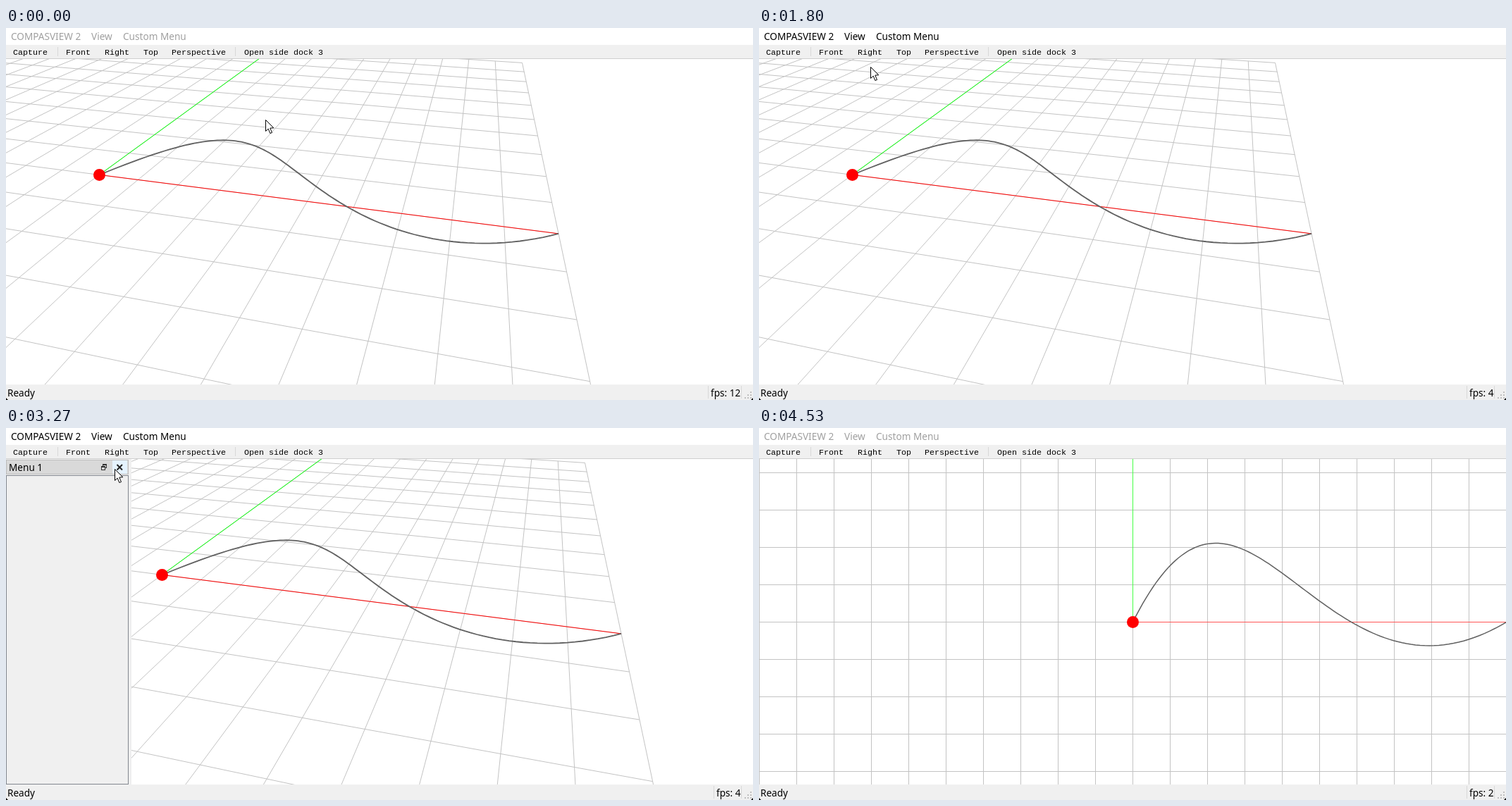
Animation, 1060 px wide and 528 px high, one loop 4.59 s. Source, as an HTML page with a canvas:

```html
<!DOCTYPE html>
<html>
<head>
<meta charset="utf-8">
<style>
html, body { margin: 0; width: 100%; height: 100%; overflow: hidden; background: #fff }
canvas { display: block }
</style>
</head>
<body>
<canvas id="stage" width="1060" height="528"></canvas>
<script>
const g = document.getElementById('stage').getContext('2d');
const LOOP = 4590, STEP = 200 / 3;
const UI = '13.6px "Noto Sans", "Open Sans", sans-serif';
const MONO = '11.667px "Liberation Mono", monospace';
const BUTTONS = [['Capture', 10], ['Front', 85], ['Right', 140], ['Top', 195],
  ['Perspective', 235], ['Open side dock 3', 338]];

// Pointer path: step, x, y
const PATH = [[0, 368, 130], [8, 371, 38], [13, 371, 38], [17, 116, 74], [18, 116, 74],
  [21, 168, 58], [24, 161, 54], [27, 158, 55], [34, 359, 40], [38, 359, 40],
  [44, 165, 80], [49, 154, 58], [50, 154, 58], [52, 166, 40], [54, 191, 36],
  [57, 191, 36], [64, 60, 532], [69, 60, 532]];
const PRESSED = [10, 26, 37, 50, 55];

const within = (k, a, b) => k >= a && k < b;

function pointer(k) {
  const i = PATH.findIndex(p => p[0] > k);
  const [a, x, y] = PATH[i - 1], [b, u, v] = PATH[i];
  const f = (k - a) / (b - a);
  return [Math.round(x + (u - x) * f), Math.round(y + (v - y) * f)];
}

function rect(x, y, w, h, fill) {
  g.fillStyle = fill;
  g.fillRect(x, y, w, h);
}

function frame(x, y, w, h, color) {
  g.strokeStyle = color;
  g.lineWidth = 1;
  g.strokeRect(x + .5, y + .5, w - 1, h - 1);
}

function text(s, x, y, font = UI, color = '#000') {
  g.font = font;
  g.fillStyle = color;
  g.fillText(s, x, y);
}

function line(points, color, width = 1) {
  g.beginPath();
  for (const p of points) g.lineTo(...p);
  g.strokeStyle = color;
  g.lineWidth = width;
  g.stroke();
}

function perspective(x, y) {
  const d = 1 - .0173 * x + .0835 * y;
  return [(132.5 + 51.59 * x + 56.9 * y) / d, (208.4 + 3.301 * x - 15.93 * y) / d];
}

const topView = (x, y) => [530 + 53 * x, 275.5 - 53 * y];

function bezier(t) {
  const s = 1 - t;
  return [9 * t * s * s + 15 * t * t * s + 10 * t ** 3, 18 * t * s * s - 9 * t * t * s];
}

function scene(top, docked) {
  const left = docked ? 178 : 0, low = top ? -10 : -8;
  const project = top ? topView : perspective;
  g.save();
  g.beginPath();
  g.rect(left, 44, 1060 - left, 462);
  g.clip();
  g.translate(left / 2 + (top ? .5 : 0), 0);
  for (let i = -10; i <= 10; i++) {
    line([project(i, low), project(i, 10)], '#c3c3c3');
    if (i >= low) line([project(-10, i), project(10, i)], '#c3c3c3');
  }
  line([project(0, 0), project(10, 0)], top ? '#f55' : '#f00');
  line([project(0, 0), project(0, 10)], top ? '#4f4' : '#0f0');
  const curve = Array.from({ length: 101 }, (_, i) => project(...bezier(i / 100)));
  line(curve, '#606060', top ? 1.5 : 1.8);
  g.beginPath();
  g.arc(...project(0, 0), 8.5, 0, 7);
  g.fillStyle = '#f00';
  g.fill();
  g.restore();
}

function dock(mx, my, down) {
  rect(0, 44, 178, 462, '#f0f0f0');
  rect(0, 45, 174, 21, '#d9d9d9');
  frame(0, 45, 174, 21, '#bdbdbd');
  text('Menu 1', 4, 61);
  if (within(mx, 151, 172) && within(my, 45, 66))
    rect(151, 46, 21, 19, down ? '#cce8ff' : '#e5f3ff');
  frame(137, 51, 6, 6, '#333');
  rect(137, 51, 6, 2, '#333');
  rect(135, 54, 6, 6, '#d9d9d9');
  frame(135, 54, 6, 6, '#333');
  rect(135, 54, 6, 2, '#333');
  line([[157.5, 52], [165, 59.5]], '#222', 1.9);
  line([[165, 52], [157.5, 59.5]], '#222', 1.9);
  frame(0, 67, 174, 439, '#82878f');
}

function toolbar(mx, my, down) {
  rect(0, 24, 1060, 20, '#f0f0f0');
  rect(0, 43, 1060, 1, '#cfcfcf');
  rect(73, 27, 1, 13, '#d8d8d8');
  rect(325, 27, 1, 13, '#d8d8d8');
  for (const [label, x] of BUTTONS) {
    const w = 7 * label.length + 18;
    const hover = within(my, 24, 43) && within(mx, x - 8, x - 8 + w);
    const shift = hover && down ? 1 : 0;
    if (hover) {
      rect(x - 8, 24, w, 19, down ? '#cce8ff' : '#e5f3ff');
      frame(x - 8, 24, w, 19, down ? '#99d1ff' : '#d9edff');
    }
    text(label, x + shift, 38 + shift, MONO);
  }
}

function statusBar(fps) {
  rect(0, 506, 1060, 22, '#f0f0f0');
  text('Ready', 2, 523);
  const x = fps > 9 ? 1000 : 1008;
  text('fps: ' + fps, x, 523);
  rect(x - 4, 508, 1, 18, '#d8d8d8');
  rect(1043, 508, 1, 18, '#d8d8d8');
  for (let r = 0; r < 3; r++)
    for (let c = 2 - r; c < 3; c++) rect(1048 + 4 * c, 516 + 4 * r, 2, 2, '#bfbfbf');
  for (const [x, d] of [[0, 3], [1060, -3]]) {
    g.beginPath();
    g.moveTo(x, 525);
    g.lineTo(x, 528);
    g.lineTo(x + d, 528);
    g.fillStyle = '#000';
    g.fill();
  }
}

function arrow(x, y) {
  g.save();
  g.translate(x + .5, y + .5);
  g.beginPath();
  for (const p of [[0, 0], [0, 16], [3.7, 12.6], [6.3, 19], [9, 18], [6.3, 11.6], [11.3, 11.3]])
    g.lineTo(...p);
  g.closePath();
  g.fillStyle = '#fff';
  g.fill();
  g.strokeStyle = '#000';
  g.lineWidth = 1;
  g.stroke();
  g.restore();
}

function draw(now) {
  const k = Math.floor((now % LOOP + 4) / STEP);
  const [mx, my] = pointer(k), down = PRESSED.includes(k);
  const docked = within(k, 11, 27) || within(k, 39, 51);
  rect(0, 0, 1060, 528, '#fff');
  scene(k >= 56, docked);
  const ink = within(k, 10, 68) ? '#000' : '#a0a0a0';
  text('COMPASVIEW 2', 7, 17, UI, ink);
  text('View', 121, 17, UI, ink);
  text('Custom Menu', 166, 17, UI, ink);
  toolbar(mx, my, down);
  if (docked) dock(mx, my, down);
  statusBar(k < 27 ? 12 : k < 51 ? 4 : 2);
  arrow(mx, my);
  requestAnimationFrame(draw);
}
requestAnimationFrame(draw);
</script>
</body>
</html>
```
